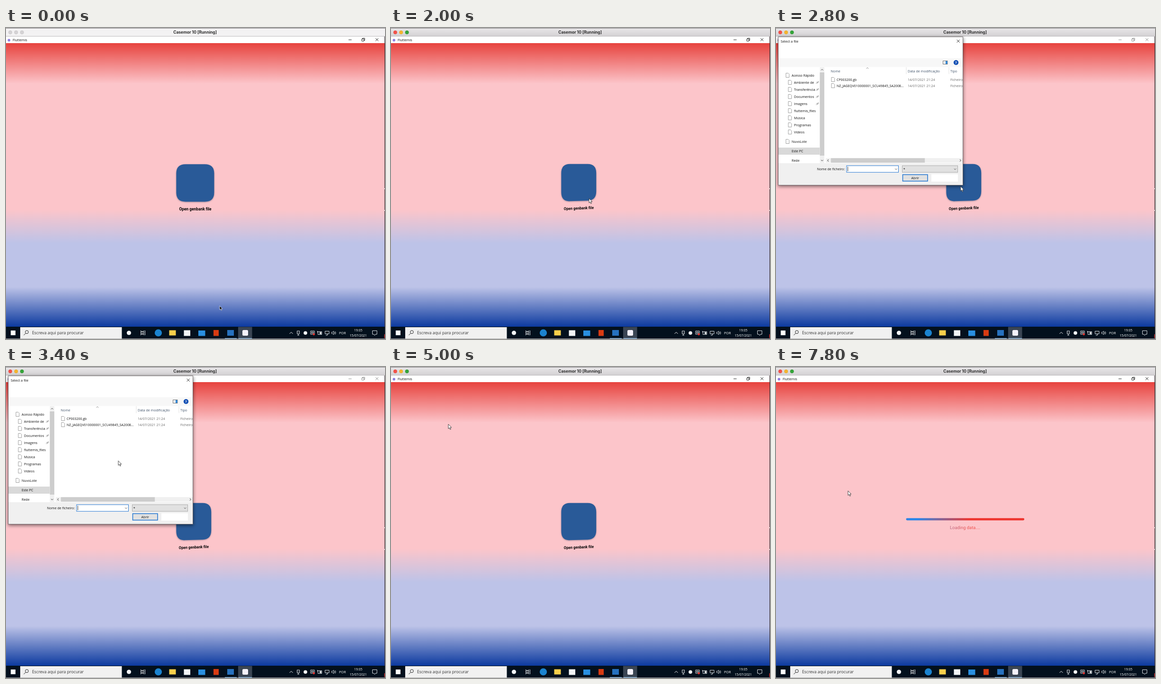
An HTML page for the animation above (8 s loop, 800 by 658 pixels).

```html
<!DOCTYPE html>
<html lang="pt">
<head>
<meta charset="utf-8">
<title>Open genbank file</title>
<style>
  html, body { margin: 0; width: 100%; height: 100%; overflow: hidden; background: #fff; }
  svg { display: block; width: 100vw; height: 100vh; }
  text { font-family: "Open Sans", "Noto Sans", sans-serif; font-size: 7.1px; white-space: pre; }
  .roboto { font-family: Roboto, sans-serif; }
  .line { fill: none; stroke-width: 1; }
</style>
</head>
<body>
<svg id="stage" viewBox="0 0 800 658" preserveAspectRatio="none">
  <defs>
    <linearGradient id="sky" x1="0" y1="0" x2="0" y2="1">
      <stop offset="0" stop-color="#e7433e"/>
      <stop offset=".143" stop-color="#fcc5ca"/>
      <stop offset=".587" stop-color="#fcc5ca"/>
      <stop offset=".705" stop-color="#bdc3e8"/>
      <stop offset=".86" stop-color="#bdc3e8"/>
      <stop offset="1" stop-color="#0c3a9f"/>
    </linearGradient>
    <linearGradient id="chrome" x1="0" y1="0" x2="0" y2="1">
      <stop offset="0" stop-color="#e9e7e9"/>
      <stop offset="1" stop-color="#d2d0d2"/>
    </linearGradient>
    <linearGradient id="sweep" gradientUnits="userSpaceOnUse" x1="0" x2="500" y1="0" y2="0" spreadMethod="repeat">
      <stop offset=".264" stop-color="#ee352f"/>
      <stop offset=".484" stop-color="#2a86ea"/>
      <stop offset=".516" stop-color="#2a86ea"/>
      <stop offset=".736" stop-color="#ee352f"/>
    </linearGradient>
    <clipPath id="dialogClip"><rect x="5" y="19" width="389.5" height="313.5"/></clipPath>
    <filter id="soft" x="-20%" y="-20%" width="140%" height="140%"><feGaussianBlur stdDeviation="1.6"/></filter>
    <filter id="wide" x="-20%" y="-20%" width="140%" height="140%"><feGaussianBlur stdDeviation="3.5"/></filter>
  </defs>

  <rect y="32" width="800" height="600" fill="url(#sky)"/>
  <g id="frame"></g>

  <g id="open">
    <path id="badgeShade" fill="#30405c" opacity=".45" filter="url(#soft)" transform="translate(0 1)"/>
    <path id="badge" fill="#295a98"/>
    <text id="caption" class="roboto" x="399.5" y="386" text-anchor="middle" style="font-size:8.4px;font-weight:600">Open genbank file</text>
  </g>

  <g id="loading" fill="url(#sweep)">
    <rect x="274.5" y="319.8" width="249.7" height="4.6" rx="2.3"/>
    <text class="roboto" x="367" y="342.6" style="font-size:9.4px" opacity=".8">Loading data....</text>
  </g>

  <g id="taskbar"></g>
  <g id="dialog"></g>
  <path id="cursor" d="M0 0V9.6L2.2 7.6L3.8 11.2L5.4 10.5L3.8 7H6.8Z" stroke-width=".8"/>
</svg>
<script>
const $ = id => document.getElementById(id);
const rect = (x, y, w, h, fill, more = '') =>
  `<rect x="${x}" y="${y}" width="${w}" height="${h}" fill="${fill}" ${more}/>`;
const dot = (x, y, r, fill, more = '') => `<circle cx="${x}" cy="${y}" r="${r}" fill="${fill}" ${more}/>`;
const line = (d, stroke, width = 1) => `<path class="line" d="${d}" stroke="${stroke}" style="stroke-width:${width}"/>`;
const label = (x, y, str, fill = '#111', css = '', more = '') =>
  `<text x="${x}" y="${y}" fill="${fill}" style="${css}" ${more}>${str}</text>`;
const mid = 'text-anchor="middle"';

function buildFrame() {
  $('frame').innerHTML =
    rect(0, 0, 800, 18, 'url(#chrome)', 'id="chromeBar"') +
    rect(0, 0, 800, 1, '#858385') +
    rect(0, 17, 800, 1, '#bdbbbd') +
    [9, 21.3, 33.7].map(x => dot(x, 9.3, 3.7, '#d0ced0', 'class="light" stroke="#b5b3b5" stroke-width=".5"')).join('') +
    label(399, 12.2, 'Casemor 10 [Running]', '#2b2b2b', 'font-family:Inter,sans-serif;font-weight:700;font-size:8.5px', mid) +
    rect(0, 18, 800, 14, '#fff') +
    dot(6.3, 25.8, 2.8, '#8d7fe0') +
    `<g id="winTitle">` + label(14, 28.2, 'Fluttemis', '#111', 'font-size:7.1px') +
    line('M723 25H729.5M751 23.3h4.6v4.4h-4.6zM752.5 23v-1.4h4.7v4.6h-1.4M780 21.6l6 6M786 21.6l-6 6', '#111', .9) + '</g>' +
    rect(799, 18, 1, 614, '#33262c') +
    rect(798.5, 339, 1.5, 2, '#ddd') + rect(798.5, 385, 1.5, 2, '#ddd');
}

function buildTaskbar() {
  const w = '#f2f4f6';
  $('taskbar').innerHTML =
    rect(0, 632, 800, 26, '#03101d') +
    rect(30, 633, 214.5, 24.5, '#f1f1f1') +
    rect(10, 640, 10, 10, '#fff') +
    line('M41.5 646l-4 4', '#222') + `<circle class="line" cx="44" cy="643.3" r="3.3" stroke="#222"/>` +
    label(55, 648.3, 'Escreva aqui para procurar', '#333', 'font-size:8.75px') +
    dot(259.5, 645, 4.6, w) +
    line('M284.5 640v2h6.5v-2M284.5 650v-2h6.5v2M284.5 643.3h6.5v3.3h-6.5zM293.5 640v10', w, .9) +
    dot(321.5, 645, 7.6, '#1b83cf') +
    rect(344.5, 639.5, 14, 11, '#f9cf4b') +
    rect(375.5, 639.5, 13.5, 12, w) +
    rect(406, 640, 14.5, 11.5, '#2a8fe0') +
    rect(438, 639, 11, 12.5, '#d83b12') +
    rect(467, 639, 14, 12, '#2671be') +
    rect(462, 656, 25, 1, '#6fa8dc') +
    rect(490, 632.5, 29.5, 25, '#3a4553', 'id="activeTile"') +
    rect(491, 656, 28, 1, '#6fa8dc') +
    rect(499, 639, 12, 12, '#f4f2fb', 'rx="2.5"') +
    line('M598.5 647l3.5-3.5l3.5 3.5', w) +
    line('M614.5 641h5v6h-5zM617 647v3M615 650h4M616.3 643.8h1.4', w, .9) +
    dot(632, 645.3, 3.8, w) +
    line('M643 641h8v7h-8zM645 643.3h4v2.4h-4z', w, .9) + dot(649.8, 648, 2.2, '#e5322d') +
    line('M658.5 642.5h8v6h-8zM657.5 641v3', w, .9) + rect(662, 643.5, 3.5, 4, w) +
    line('M673.5 641.5h8.5v5.5h-8.5zM675 650h3.5v-3', w, .9) +
    line('M687.5 643.5h2l2.3-2.2v7.6l-2.3-2.2h-2zM693.3 643.2q1.4 2 0 4M695 642q2.3 3.2 0 6.4', w, .8) +
    label(703, 647.8, 'POR', '#fff', 'font-size:7.2px') +
    label(743.5, 642, '19:05', '#fff', 'font-size:6.9px', mid) +
    label(743.5, 653.2, '15/07/2021', '#fff', 'font-size:6.8px', mid) +
    line('M773.5 640.5h9.5v7.5h-3l-1.8 2.3l-1.8-2.3h-2.9z', w, .9) +
    rect(798.6, 648, 1.4, 8, '#d6322e') +
    rect(0, 657, 800, 1, '#a9a9ab');
}

function page(x, y) {
  return line(`M${x} ${y - 4.5}h4.8l2 2v7h-6.8z`, '#8a8a8a', .8);
}

function buildDialog() {
  const side = [
    ['Acesso Rápido', 100], ['Ambiente de', 115, 1], ['Transferência', 130, 1], ['Documentos', 145, 1],
    ['Imagens', 160, 1], ['fluttemis_files', 175], ['Música', 190], ['Programas', 205], ['Vídeos', 220],
    ['NuvoLote', 240], ['Este PC', 260], ['Rede', 280]
  ];
  const tree = side.map(([name, y, pin], i) => {
    const x = i > 0 && i < 9 ? 38 : 33;
    return (i < 10 ? page(x - 12, y) : '') + label(x, y + 2.8, name) +
      (pin ? line(`M84.5 ${y + 3}l2.5-2.5M85.5 ${y - 1}l3 3M87 ${y - .2}l2-2l1.2 1.2l-2 2z`, '#777', .8) : '');
  });
  const files = [['CP003200.gb', 109], ['NZ_JAGEQV010000001_SCU49845_SA2008...', 122]].map(([name, y]) =>
    page(117, y) + label(128, y + 2.6, name, '#111', 'font-size:6.95px') +
    label(278, y + 2.6, '14/07/2021 21:24', '#6a6a6a') + label(368, y + 2.6, 'Ficheiro', '#6a6a6a'));
  const fields = [[86, 294, 59, 9], [149, 291, 110, 14.5], [266, 291, 118, 14.5], [267, 309.5, 54, 15], [328, 309.5, 56, 15.5]];

  $('dialog').innerHTML =
    rect(4.5, 20.5, 391, 315, '#000', 'opacity=".5" filter="url(#wide)"') +
    `<g clip-path="url(#dialogClip)">` +
    rect(5, 19, 390, 314, '#fff') +
    rect(5, 286, 390, 47, '#f0f0f0') +
    label(10, 30.7, 'Select a file') +
    line('M381.7 24.7l6 6M387.7 24.7l-6 6', '#111', .9) +
    rect(116, 275.3, 198.5, 9.7, '#cdcdcd', 'id="thumb"') +
    `<g id="blanks">` + fields.map(f => rect(...f, '#fff', 'opacity=".8"')).join('') +
    rect(314.5, 275.3, 68, 9.7, '#f0f0f0') + '</g>' +
    `<g id="filled">` +
    rect(5, 64, 390, 18.5, '#f7f7f7') +
    line('M352.5 69.5h9.5v7h-9.5z', '#555', .8) + rect(358, 70, 3.7, 6, '#2f86d6') +
    dot(380, 73, 5.2, '#1450b4') + label(380, 75.8, '?', '#fff', 'font-weight:700;font-size:7.5px', mid) +
    line('M190.5 86l2.5-2.2l2.5 2.2', '#777', .8) +
    line('M275 83v14.5M365 83v14.5', '#e2e2e2') +
    label(115.5, 93.6, 'Nome', '#42546b') + label(278, 93.6, 'Data de modificação', '#42546b') + label(368, 93.6, 'Tipo', '#42546b') +
    files.join('') +
    rect(5, 253, 87, 15, '#d9d9d9') +
    `<svg x="0" y="0" width="92" height="285.5" style="width:92px;height:285.5px">${tree.join('')}</svg>` +
    rect(92.5, 83, 9.5, 202.5, '#f0f0f0') + rect(92.5, 94, 9.5, 176, '#cdcdcd') +
    line('M95 89.5l2.3-2.3l2.3 2.3M95 279l2.3 2.3l2.3-2.3', '#444') +
    rect(105, 275.3, 11, 9.7, '#f0f0f0') + rect(314.5, 275.3, 80, 9.7, '#f0f0f0') +
    line('M111 278l-2.3 2.3l2.3 2.3M388 278l2.3 2.3l-2.3 2.3', '#333') +
    label(145.3, 300.8, 'Nome de ficheiro:', '#111', '', 'text-anchor="end"') +
    rect(149, 291.3, 109.5, 14, '#fff', 'stroke="#2a7ad2"') +
    line('M151.7 293.5v9.5', '#111', .8) +
    line('M251.2 297.5l2.2 2.2l2.2-2.2', '#444', .9) +
    rect(266.5, 291.3, 117, 14, '#e1e1e1', 'stroke="#adadad"') +
    line('M375.8 297.5l2.2 2.2l2.2-2.2', '#444', .9) +
    label(268.7, 301.3, '*') +
    rect(267.5, 310.3, 52.5, 13.6, '#e1e1e1', 'stroke="#2a7ad2" stroke-width="1.6"') +
    label(293.8, 319.8, 'Abrir', '#111', '', mid) +
    rect(328, 309.3, 56, 15.7, '#fff') +
    '</g></g>' +
    rect(4.8, 18.8, 389.6, 313.7, 'none', 'stroke="#5c5457" stroke-width=".8"');
}

const path = [
  [0, 451, 588], [200, 451, 588], [800, 428, 387], [1000, 428, 387], [1800, 418, 360.5], [2600, 418, 360.5],
  [3400, 237, 198.5], [3600, 237, 198.5], [4200, 121, 121], [5000, 121, 121], [5800, 152, 262], [8000, 152, 262]
];
const clamp = v => Math.max(0, Math.min(1, v));
const ease = v => v * v * (3 - 2 * v);
const show = (id, on) => $(id).setAttribute('display', on ? 'inline' : 'none');

function cursorAt(t) {
  const i = path.findIndex(p => p[0] > t);
  const [t0, x0, y0] = path[i - 1], [t1, x1, y1] = path[i];
  const k = ease((t - t0) / (t1 - t0));
  return [x0 + (x1 - x0) * k, y0 + (y1 - y0) * k];
}

// The card turns away on its right side while the pointer is over it.
function tilt(k) {
  const r = .245, s = 1 - r;
  const at = (u, v) => `${359.4 + u * (80 - 6.2 * k)} ${288.2 + v * (79.2 - 2.2 * u * k) - .5 * k}`;
  const d = `M${at(r, 0)}L${at(s, 0)}Q${at(1, 0)} ${at(1, r)}L${at(1, s)}Q${at(1, 1)} ${at(s, 1)}` +
    `L${at(r, 1)}Q${at(0, 1)} ${at(0, s)}L${at(0, r)}Q${at(0, 0)} ${at(r, 0)}Z`;
  $('badge').setAttribute('d', d);
  $('badgeShade').setAttribute('d', d);
  const a = 1 - .078 * k, b = -.035 * k;
  $('caption').setAttribute('transform',
    `translate(${365.5 - .5 * k} ${386 - .7 * k}) matrix(${a} ${b} 0 1 0 0) translate(-365.5 -386)`);
}

function draw(t) {
  const focused = t >= 600;
  const dialog = t >= 2600 && t < 4800;
  const opening = t < 2800;
  const loading = t >= 5400;

  $('chromeBar').setAttribute('fill', focused ? 'url(#chrome)' : '#f3f2f3');
  document.querySelectorAll('.light').forEach((el, i) => {
    el.setAttribute('fill', focused ? ['#f4524a', '#f5b52e', '#35a63a'][i] : '#d5d3d5');
    el.setAttribute('stroke', focused ? ['#d8423b', '#d89b24', '#25832b'][i] : '#bbb9bb');
  });
  $('winTitle').setAttribute('opacity', dialog ? .5 : 1);
  show('activeTile', !(dialog && opening));

  show('open', !loading);
  tilt(ease(clamp((t - 1000) / 800)));

  show('loading', loading);
  const shift = 192 + (t - 6200) * 348 / 1600;
  $('sweep').setAttribute('gradientTransform', `translate(${shift} 0)`);

  show('dialog', dialog);
  show('filled', !opening);
  show('blanks', opening);
  $('thumb').setAttribute('fill', opening ? '#b4b4b4' : '#cdcdcd');
  $('dialog').setAttribute('opacity', opening ? .6 : 1);
  $('dialog').setAttribute('transform', opening ? 'translate(199.5 175.5) scale(.98) translate(-199.5 -175.5)' : '');

  const [x, y] = cursorAt(t);
  const arrow = $('cursor');
  arrow.setAttribute('transform', `translate(${x} ${y}) scale(${focused ? 1 : .85})`);
  arrow.setAttribute('fill', focused ? '#fff' : '#000');
  arrow.setAttribute('stroke', focused ? '#222' : '#fff');
}

const LOOP = 8000, STEP = 200;
function tick() {
  const t = performance.now() % LOOP;
  draw(Math.floor(t / STEP) * STEP);
  requestAnimationFrame(tick);
}

buildFrame();
buildTaskbar();
buildDialog();
tick();
</script>
</body>
</html>
```
